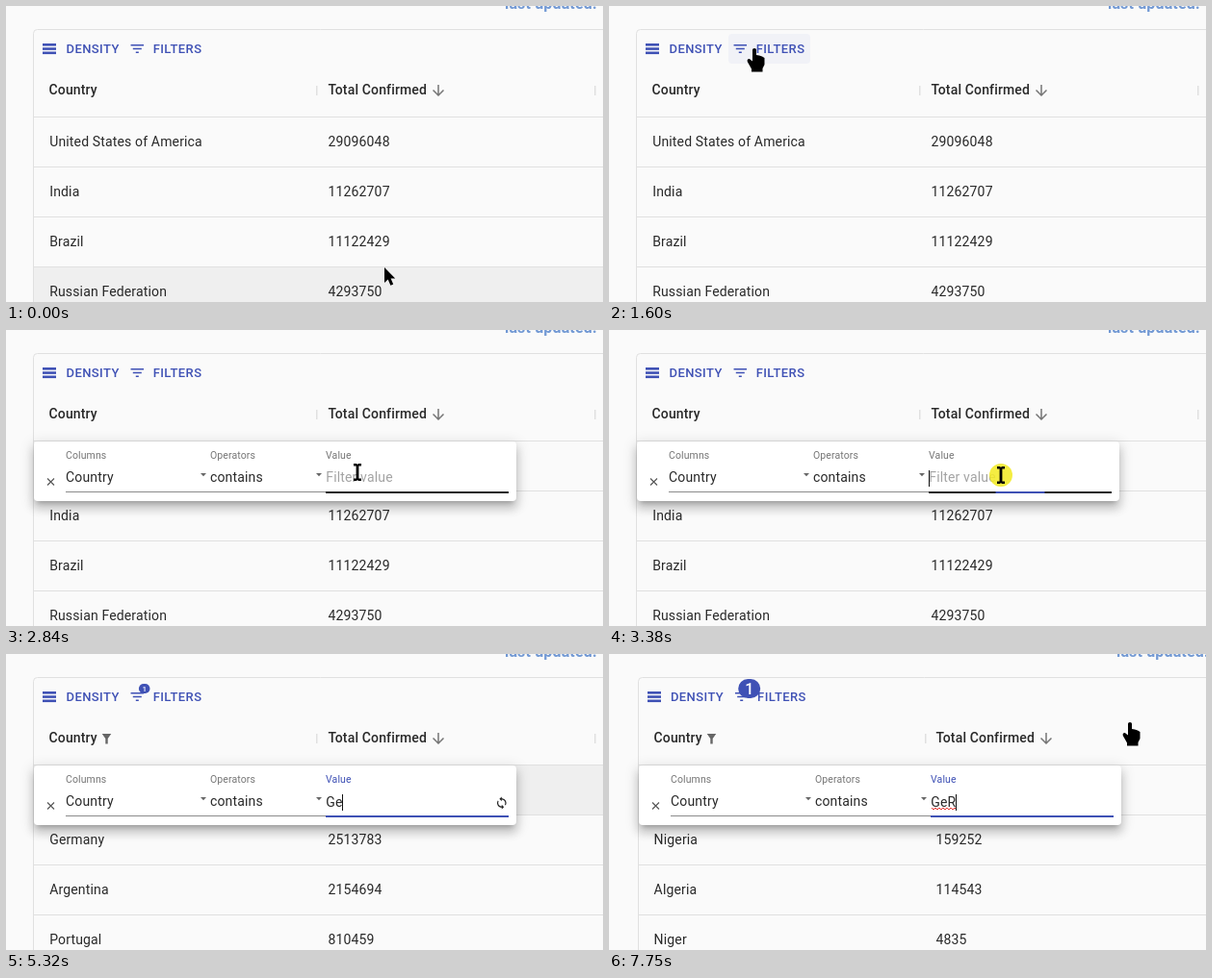
An HTML page with a canvas for the animation above (8000 ms loop, 620x308 px).

```html
<!DOCTYPE html>
<html lang="en">
<head>
<meta charset="utf-8">
<title>Data grid filter</title>
<style>
html, body { margin: 0; width: 620px; height: 308px; overflow: hidden; background: #fafafa; }
canvas { display: block; }
</style>
</head>
<body>
<canvas id="stage" width="620" height="308"></canvas>
<script>
const ctx = document.getElementById('stage').getContext('2d');
const LOOP = 8000;
const BLUE = '#3f51b5', INK = 'rgba(0,0,0,.84)', LINE = '#e0e0e0';
const FONT = 'Roboto, Arial, sans-serif';

// Screen updates: start, end, number of updates
const BURSTS = [
  [0, 0, 1], [70, 820, 10], [900, 900, 1], [1050, 1300, 4], [1520, 1600, 2],
  [2210, 2980, 12], [3060, 3060, 1], [3380, 3920, 8], [4390, 4390, 1],
  [5170, 5400, 4], [6240, 6240, 1], [6410, 6480, 2], [7040, 7040, 1], [7430, 7750, 5]
];

// Pointer hot spot: time, x, y
const PATH = [
  [0, 393, 272], [820, 99, 50], [980, 99, 50], [1300, 151, 44], [2150, 151, 44],
  [2450, 167, 136], [2980, 406, 151], [3060, 407, 151], [3457, 407, 151],
  [3843, 541, 152], [7360, 541, 152], [7750, 541, 71]
];

const ROWS = {
  all: [['United States of America', '29096048'], ['India', '11262707'],
        ['Brazil', '11122429'], ['Russian Federation', '4293750']],
  g: [['United Kingdom', '4223236'], ['Germany', '2513783'],
      ['Argentina', '2154694'], ['Portugal', '810459']],
  ger: [['Germany', '2513783'], ['Nigeria', '159252'],
        ['Algeria', '114543'], ['Niger', '4835']]
};

const ICON = {
  filter: new Path2D('M10 18h4v-2h-4v2zM3 6v2h18V6H3zm3 7h12v-2H6v2z'),
  down: new Path2D('M20 12l-1.41-1.41L13 16.17V4h-2v12.17l-5.58-5.59L4 12l8 8 8-8z'),
  sync: new Path2D('M12 4V1L8 5l4 4V6c3.31 0 6 2.69 6 6 0 1.01-.25 1.97-.7 2.8l1.46 1.46C19.54 15.03 20 13.57 20 12c0-4.42-3.58-8-8-8zm0 14c-3.31 0-6-2.69-6-6 0-1.01.25-1.97.7-2.8L5.24 7.74C4.46 8.97 4 10.43 4 12c0 4.42 3.58 8 8 8v3l4-4-4-4v3z'),
  funnel: new Path2D('M0 0h9.6L6 5v5.5H3.6V5z'),
  arrow: new Path2D('M0 0V16L3.7 12.6 6.4 18.8 9.2 17.6 6.6 11.6H11.2z'),
  hand: new Path2D('M-2 1.5Q-2 0 0 0Q2 0 2 1.5V7L5 7.5L8 8.5L10.5 10V17L8.5 21V24.5H-3V21.5L-7.2 14Q-8 11 -5.2 11L-2 13.5Z'),
  beam: new Path2D('M-4-9h3l1 1 1-1h3v2.4h-2.6V6.6H4V9H1L0 8-1 9H-4V6.6h2.6V-6.6H-4z')
};

const clamp = v => Math.max(0, Math.min(1, v));
const ramp = (t, a, b) => clamp((t - a) / (b - a));

function snap(t) {
  let last = 0;
  for (const [a, b, n] of BURSTS) {
    if (t < a) break;
    const gap = n > 1 ? (b - a) / (n - 1) : 1;
    last = a + Math.min(n - 1, Math.floor((t - a) / gap + 1e-6)) * gap;
  }
  return last;
}

function pointerAt(t) {
  const i = PATH.findIndex(p => p[0] > t);
  if (i < 0) return PATH[PATH.length - 1].slice(1);
  const [ta, xa, ya] = PATH[i - 1], [tb, xb, yb] = PATH[i];
  const p = (t - ta) / (tb - ta), e = p * p * (3 - 2 * p);
  return [xa + (xb - xa) * e, ya + (yb - ya) * e];
}

function rect(x, y, w, h, color) {
  ctx.fillStyle = color;
  ctx.fillRect(x, y, w, h);
}

function round(x, y, w, h, r, color) {
  ctx.fillStyle = color;
  ctx.beginPath();
  ctx.roundRect(x, y, w, h, r);
  ctx.fill();
}

function text(str, x, y, size, color = INK, weight = 400, gap = .15) {
  ctx.font = `${weight} ${size}px ${FONT}`;
  ctx.letterSpacing = gap + 'px';
  ctx.fillStyle = color;
  ctx.fillText(str, x, y);
  return ctx.measureText(str).width;
}

function icon(path, x, y, scale, color) {
  ctx.save();
  ctx.translate(x, y);
  ctx.scale(scale, scale);
  ctx.fillStyle = color;
  ctx.fill(path);
  ctx.restore();
}

function shadow(x, y, w, h, dy, blur, spread, alpha) {
  const far = 2000;
  ctx.save();
  ctx.shadowColor = `rgba(0,0,0,${alpha})`;
  ctx.shadowBlur = blur;
  ctx.shadowOffsetX = far;
  ctx.shadowOffsetY = dy;
  round(x - far - spread, y - spread, w + 2 * spread, h + 2 * spread, 4, '#000');
  ctx.restore();
}

function drawToolbar(t, dx) {
  const tint = a => `rgba(63,81,181,${.045 * a})`;
  const density = ramp(t, 740, 900) * (1 - ramp(t, 1060, 1300));
  const filters = ramp(t, 1060, 1300) * (1 - ramp(t, 2180, 2400));
  if (density) round(33, 29, 91, 31, 4, tint(density));
  if (filters) round(124, 29, 85, 31, 4, tint(filters));
  for (let i = 0; i < 3; i++) rect(38 + dx, 39 + i * 4.25, 14, 2.6, BLUE);
  text('DENSITY', 62.5 + dx * .7, 49, 13, BLUE, 500, .42);
  icon(ICON.filter, 127.3 + dx * .7, 35.5, .75, BLUE);
  text('FILTERS', 152.7 + dx * .7, 49, 13, BLUE, 500, .42);

  const size = ramp(t, 5100, 5390);
  if (size) {
    ctx.save();
    ctx.translate(143.7 + dx, 36);
    ctx.scale(size, size);
    round(-11.5, -10, 23, 20, 10, BLUE);
    ctx.textAlign = 'center';
    text('1', 0, 5.6, 16, '#fff', 500, 0);
    ctx.restore();
  }
}

function drawGrid(t, dx, hover) {
  const numX = dx ? 339.5 : 334.5;
  ctx.strokeStyle = LINE;
  ctx.lineWidth = 1;
  ctx.beginPath();
  ctx.roundRect(28.5 + dx, 24.5, 700, 400, 4);
  ctx.stroke();
  drawToolbar(t, dx);

  text('Country', 44.5 + dx, 92, 14, INK, 500);
  text('Total Confirmed', numX, 92, 14, INK, 500);
  icon(ICON.down, numX + 105.5, 79, .75, '#757575');
  if (t > 5165) icon(ICON.funnel, 99.7 + dx, 83, 1, '#666');
  rect(dx ? 328 : 322, 83, 1.5, 10, LINE);
  if (!dx) rect(611, 83, 1.5, 10, LINE);

  const rows = t < 5165 ? ROWS.all : t < 6235 ? ROWS.g : ROWS.ger;
  rows.forEach(([name, total], i) => {
    const y = 115 + 52 * i;
    if (i === hover) rect(29 + dx, y + 1, 620, 51, '#efefef');
    rect(29 + dx, y, 620, 1, LINE);
    text(name, 45.2 + dx * .7, y + 31, 14);
    text(total, numX, y + 31, 14);
  });
}

function drawField(t, x, y) {
  const typed = t < 4385 ? '' : t < 5165 ? 'G' : t < 6235 ? 'Ge' : 'GeR';
  const focus = ramp(t, 3325, 3530);
  const over = t < 3900 && x > 332 && x < 522 && y > 143;
  text('Value', 332, 134, 10.5, t > 3450 ? BLUE : 'rgba(0,0,0,.54)', 400, .11);
  if (over) rect(332, 168, 190, 2, '#212121');
  if (focus) rect(427 - 95 * focus, 168, 190 * focus, 2, BLUE);

  let w = 0;
  if (typed) w = text(typed, 332.3, 159, 14);
  else text('Filter value', 332.3, 158, 14, 'rgba(0,0,0,.36)');

  if (t > 6475) {
    ctx.strokeStyle = '#e53935';
    ctx.lineWidth = 1;
    ctx.beginPath();
    for (let i = 0; i <= w; i += 2) ctx.lineTo(333 + i, i % 4 ? 162 : 160);
    ctx.stroke();
  }
  const caret = (t > 3375 && t < 6235) || (t > 6405 && t < 7035) || t > 7570;
  if (caret) rect(Math.round(332 + w), 146, 1, 17, '#111');
  if (t > 4385 && t < 6235) icon(ICON.sync, 507.6, 147.8, .6, '#222');
}

function drawPanel(t, dx, x, y) {
  const open = ramp(t, 2150, 2430);
  if (!open) return;
  const ease = 1 - (1 - open) ** 2, s = .75 + .25 * ease;
  ctx.save();
  ctx.globalAlpha = ease;
  ctx.translate(29 + dx, 116);
  ctx.scale(s, s * s);
  ctx.translate(-29, -116);
  const box = [29, 116, 501, 62];
  shadow(...box, 5, 5, -3, .2);
  shadow(...box, 8, 10, 1, .14);
  shadow(...box, 3, 14, 2, .12);
  round(...box, 4, '#fff');

  ctx.strokeStyle = '#555';
  ctx.lineWidth = 1.1;
  ctx.beginPath();
  ctx.moveTo(43, 154.5); ctx.lineTo(50, 161.5);
  ctx.moveTo(50, 154.5); ctx.lineTo(43, 161.5);
  ctx.stroke();

  rect(62, 168, 460, 1, '#8c8c8c');
  for (const [label, value, left, arrow] of [
    ['Columns', 'Country', 62, 202], ['Operators', 'contains', 212, 322]
  ]) {
    text(label, left, 134, 10.5, 'rgba(0,0,0,.54)', 400, .11);
    text(value, left, 158, 14);
    ctx.fillStyle = '#666';
    ctx.beginPath();
    ctx.moveTo(arrow, 149); ctx.lineTo(arrow + 6, 149); ctx.lineTo(arrow + 3, 152.2);
    ctx.fill();
  }
  drawField(t, x, y);
  ctx.restore();
}

function drawPointer(t, x, y) {
  const click = (t > 1515 && t < 1595) || (t > 3375 && t < 3450);
  if (click) {
    ctx.fillStyle = 'rgba(242,234,40,.88)';
    ctx.beginPath();
    ctx.arc(x, y, 12, 0, 7);
    ctx.fill();
  }
  if (t > 3915 && t < 7425) return;
  const modal = t > 2205 && t < 4000;
  const shape = modal && x > 332 && x < 522 && y > 143 ? ICON.beam
    : !modal && y < 115 ? ICON.hand : ICON.arrow;
  icon(shape, Math.round(x), Math.round(y), 1, '#000');
}

function hoverRow(t, x, y) {
  const blocked = t > 2205 && x < 530;
  return blocked || y < 116 ? -1 : Math.floor((y - 115) / 52);
}

function draw(t) {
  const [x, y] = pointerAt(t);
  const dx = t > 6235 ? 2 : 0;
  rect(0, 0, 620, 308, '#fafafa');
  text('last updated:', dx ? 527 : 518, 2.5, 16, '#7299d4', 700);
  drawGrid(t, dx, hoverRow(t, x, y));
  drawPanel(t, dx, x, y);
  drawPointer(t, x, y);
}

const start = performance.now();
function tick() {
  draw(snap((performance.now() - start) % LOOP));
  requestAnimationFrame(tick);
}
tick();
</script>
</body>
</html>
```
